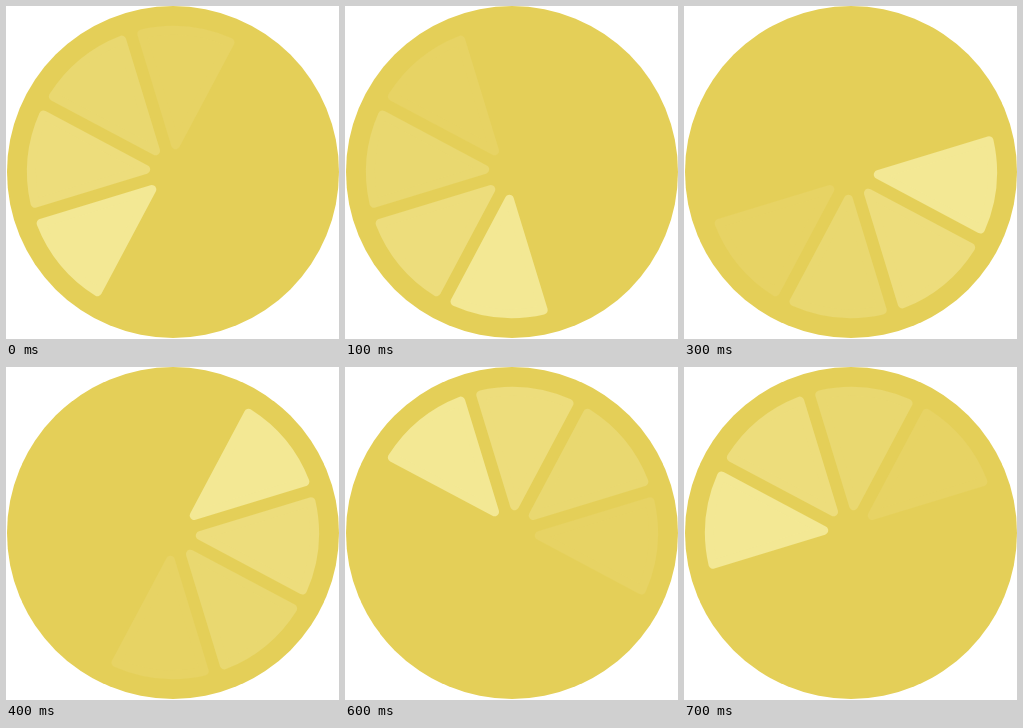
Animation, 333 px wide and 333 px high, one loop 800 ms. Source, as an HTML page:

```html
<!DOCTYPE html>
<html lang="en">
<head>
<meta charset="utf-8">
<title>Citrus spinner</title>
<style>
  html, body { margin: 0; width: 100%; height: 100%; overflow: hidden; background: #fff; }
  svg { display: block; width: 100%; height: 100%; }
</style>
</head>
<body>
<svg viewBox="0 0 333 333">
  <circle cx="167" cy="166" r="166" fill="#e4cf58"/>
  <g id="wedges" transform="translate(167 166)" stroke-width="9" stroke-linejoin="round"></g>
</svg>
<script>
const COUNT = 8, STEP = 100, TILT = 5.5;
const RADIUS = 146, HALF_GAP = 6, CORNER = 4.5;
const BASE = '#e4cf58';
const SHADES = ['#f3e894', '#eddd7c', '#e9d870', '#e7d364'];

// The wedge is inset by the corner radius; its round-joined stroke restores the size.
function wedgePath() {
  const half = Math.PI / COUNT;
  const inset = HALF_GAP + CORNER;
  const r = RADIUS - CORNER;
  const a = half - Math.asin(inset / r);
  const x = r * Math.sin(a), y = -r * Math.cos(a);
  const tip = -inset / Math.sin(half);
  return `M0 ${tip}L${-x} ${y}A${r} ${r} 0 0 1 ${x} ${y}Z`;
}

const group = document.getElementById('wedges');
const shape = wedgePath();
const wedges = Array.from({ length: COUNT }, (_, i) => {
  const path = document.createElementNS('http://www.w3.org/2000/svg', 'path');
  path.setAttribute('d', shape);
  path.setAttribute('transform', `rotate(${TILT + i * 360 / COUNT})`);
  group.append(path);
  return path;
});

// The bright wedge steps counterclockwise, with a fading tail behind it.
function draw(time) {
  const step = Math.floor(time / STEP) % COUNT;
  const lead = (5 - step + COUNT) % COUNT;
  wedges.forEach((path, i) => {
    const shade = SHADES[(i - lead + COUNT) % COUNT];
    path.style.display = shade ? '' : 'none';
    path.setAttribute('fill', shade || BASE);
    path.setAttribute('stroke', shade || BASE);
  });
}

let start;
function tick(now) {
  start ??= now;
  draw(Math.max(0, now - start));
  requestAnimationFrame(tick);
}
draw(0);
requestAnimationFrame(tick);
</script>
</body>
</html>
```
